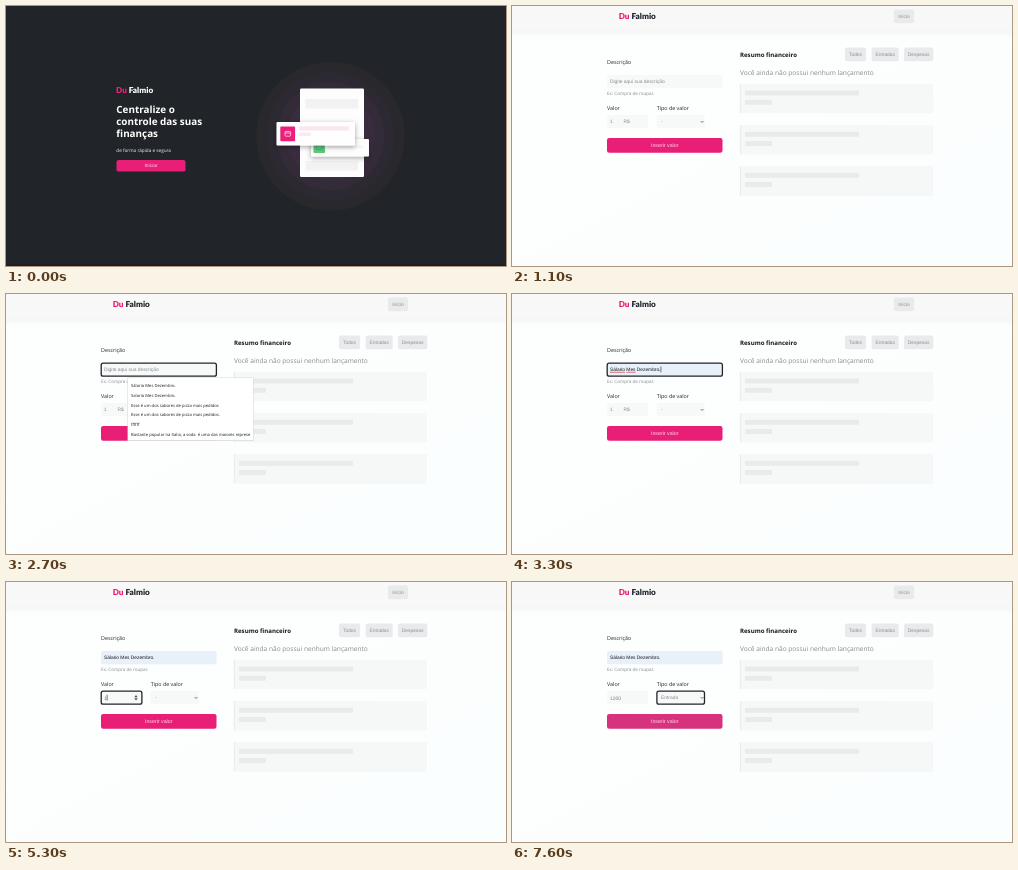
These frames come from a looping animation (500x260 px, 8000 ms). An HTML page:

```html
<!DOCTYPE html>
<html lang="pt-BR">
<head>
<meta charset="utf-8">
<title>Finanças</title>
<style>
html, body { margin: 0; height: 100%; overflow: hidden; background: #212529; }
svg { display: block; width: 100vw; height: 100vh; }
text { font-family: "Open Sans", "Noto Sans", sans-serif; text-rendering: geometricPrecision; white-space: pre; }
.ui text, text.ui { font-family: "Liberation Sans", Arial, sans-serif; font-size: 4.9px; }
.logo { font: 900 8.2px Lato, sans-serif; }
.bold { font-weight: 700; }
.mid { text-anchor: middle; }
.label { font-size: 5.35px; fill: #212529; }
.field { fill: #f7f8f8; }
.ring { fill: none; stroke: #22252a; stroke-width: 1.3; }
.caret { fill: #111; }
.mute { fill: #868b90; }
.list text { font-size: 4.17px; fill: #16181b; }

/* 1% of the loop is 80 ms */
.t { animation: 8s step-end infinite; }
.home { animation-name: home; }
.dash { animation-name: dash; }
.start { fill: #e91e77; animation-name: start; }
.send { fill: #e91e77; animation-name: send; }
.spin { animation-name: spin; }
.d-ring { animation-name: d-ring; }
.d-hint { animation-name: d-hint; }
.d-fill { animation-name: d-fill; }
.d-caret { animation-name: d-caret; }
.d-spell { animation-name: d-spell; }
.d-list { animation-name: d-list; }
.d-row { animation-name: d-row; }
.v-ring { animation-name: v-ring; }
.v-hint { animation-name: v-hint; }
.v-caret { animation-name: v-caret; }
.n1 { animation-name: n1; }
.n2 { animation-name: n2; }
.n3 { animation-name: n3; }
.n4 { animation-name: n4; }
.s-ring { animation-name: s-ring; }
.s-list { animation-name: s-list; }
.s-row { animation-name: s-row; }
.s-none { animation-name: s-none; }
.s-in { animation-name: s-in; }

@keyframes home { 0% { opacity: 1 } 13.75%, 100% { opacity: 0 } }
@keyframes dash { 0% { opacity: 0 } 13.75%, 100% { opacity: 1 } }
@keyframes start { 0% { fill: #e91e77 } 5%, 100% { fill: #d8367f } }
@keyframes send {
  0% { fill: #e91e77 } 20% { fill: #d6327d } 21.25% { fill: #e91e77 } 95%, 100% { fill: #d6327d }
}
@keyframes spin {
  0% { opacity: 0 } 21.25% { opacity: 1 } 22.5% { opacity: 0 } 47.5% { opacity: 1 } 85%, 100% { opacity: 0 }
}
@keyframes d-ring { 0% { opacity: 0 } 26.25% { opacity: 1 } 51.25%, 100% { opacity: 0 } }
@keyframes d-hint { 0% { opacity: 1 } 35%, 100% { opacity: 0 } }
@keyframes d-fill { 0% { opacity: 0 } 35%, 100% { opacity: 1 } }
@keyframes d-caret {
  0% { opacity: 0; transform: none } 26.25% { opacity: 1; transform: none }
  33.75% { opacity: 0; transform: none } 41.25% { opacity: 1; transform: translateX(50.8px) }
  46.25%, 100% { opacity: 0; transform: none }
}
@keyframes d-spell { 0% { opacity: 0 } 41.25% { opacity: 1 } 51.25%, 100% { opacity: 0 } }
@keyframes d-list { 0% { opacity: 0 } 26.25% { opacity: 1 } 41.25%, 100% { opacity: 0 } }
@keyframes d-row { 0% { opacity: 0 } 35% { opacity: 1 } 41.25%, 100% { opacity: 0 } }
@keyframes v-ring { 0% { opacity: 0 } 51.25% { opacity: 1 } 85%, 100% { opacity: 0 } }
@keyframes v-hint { 0% { opacity: 1 } 66.25%, 100% { opacity: 0 } }
@keyframes v-caret {
  0% { opacity: 0; transform: none } 51.25% { opacity: 1; transform: none }
  58.75% { opacity: 0; transform: none } 66.25% { opacity: 1; transform: translateX(2.7px) }
  67.5% { opacity: 1; transform: translateX(5.4px) } 71.25% { opacity: 1; transform: translateX(8.1px) }
  72.5% { opacity: 1; transform: translateX(10.9px) } 80%, 100% { opacity: 0; transform: none }
}
@keyframes n1 { 0% { visibility: hidden } 66.25%, 100% { visibility: visible } }
@keyframes n2 { 0% { visibility: hidden } 67.5%, 100% { visibility: visible } }
@keyframes n3 { 0% { visibility: hidden } 71.25%, 100% { visibility: visible } }
@keyframes n4 { 0% { visibility: hidden } 72.5%, 100% { visibility: visible } }
@keyframes s-ring { 0% { opacity: 0 } 85%, 100% { opacity: 1 } }
@keyframes s-list { 0% { opacity: 0 } 85% { opacity: 1 } 91.25%, 100% { opacity: 0 } }
@keyframes s-row { 0% { transform: none } 87.5%, 100% { transform: translateY(8px) } }
@keyframes s-none { 0% { opacity: 1 } 91.25%, 100% { opacity: 0 } }
@keyframes s-in { 0% { opacity: 0 } 91.25%, 100% { opacity: 1 } }
</style>
</head>
<body>
<svg viewBox="0 0 500 260" preserveAspectRatio="none">
  <defs>
    <filter id="shade" x="-20%" y="-40%" width="140%" height="200%">
      <feDropShadow dx="0" dy="1.5" stdDeviation="2.5" flood-color="#000" flood-opacity=".35"/>
    </filter>
    <filter id="soft" x="-10%" y="-50%" width="120%" height="200%"><feGaussianBlur stdDeviation=".7"/></filter>
    <linearGradient id="fade" x2="0" y2="1"><stop stop-color="#f5f5f6"/><stop offset="1" stop-color="#fdfefe"/></linearGradient>
    <linearGradient id="page" x2="1" y2="1"><stop stop-color="#fefefe"/><stop offset="1" stop-color="#fbfefe"/></linearGradient>
    <g id="empty">
      <rect x="228" width="193" height="29.5" rx="1" fill="#f6f7f7"/>
      <rect x="227.8" width="1.2" height="29.5" fill="#ececed"/>
      <g fill="#e9eaea" filter="url(#soft)">
        <rect x="233" y="6.8" width="114" height="5" rx="1"/>
        <rect x="233" y="16" width="27" height="5" rx="1"/>
      </g>
    </g>
  </defs>

  <g class="t home">
    <rect width="500" height="260" fill="#212529"/>
    <rect y="258.5" width="500" height="1.5" fill="#1b1e22"/>
    <text class="logo" x="110" y="87.4" fill="#fff"><tspan fill="#f0217c">Du</tspan> Falmio</text>
    <g class="bold" font-size="9.9" fill="#fff">
      <text x="110.3" y="107.3">Centralize o</text>
      <text x="110.3" y="119.1">controle das suas</text>
      <text x="110.3" y="130.9">finanças</text>
    </g>
    <text x="110.3" y="146.2" font-size="4.67" fill="#f4f5f6">de forma rápida e segura</text>
    <rect class="t start" x="110.5" y="154" width="69" height="11.6" rx="2.2"/>
    <text class="ui mid" x="145" y="161.4" fill="#fbd9e8">Iniciar</text>

    <circle cx="324.5" cy="130.3" r="74.3" fill="#28282d"/>
    <circle cx="324.5" cy="130.3" r="64" fill="#2d2932"/>
    <circle cx="324.5" cy="130.3" r="54" fill="#342b39"/>
    <circle cx="324.5" cy="130.3" r="44" fill="#3a2c3f"/>
    <rect x="294" y="82.5" width="64" height="88.5" rx="1.2" fill="#fdfdfd"/>
    <g fill="#f2f2f3">
      <rect x="299.5" y="93" width="52.5" height="9.5" rx="1"/>
      <rect x="299.5" y="155" width="52.5" height="9.5" rx="1"/>
    </g>
    <g filter="url(#shade)">
      <rect x="305" y="133" width="58" height="17.5" rx="1" fill="#fdfdfd"/>
      <rect x="307.5" y="135.5" width="11.5" height="11.5" rx=".8" fill="#5fc67c"/>
    </g>
    <rect x="310.5" y="139.5" width="5.5" height="4" rx=".8" fill="none" stroke="#4aa765" stroke-width=".7"/>
    <rect x="322" y="139" width="35" height="3.5" rx="1" fill="#f3f6f4"/>
    <g filter="url(#shade)">
      <rect x="270.5" y="116" width="78.5" height="23.5" rx="1" fill="#fefefe"/>
    </g>
    <rect x="274.3" y="120.5" width="14.8" height="14.8" rx="1" fill="#ec1f79"/>
    <g fill="none" stroke="#ffd9ea" stroke-width=".8">
      <rect x="279" y="125.4" width="5.6" height="4.8" rx=".9"/>
      <path d="M279 127h5.6"/>
    </g>
    <rect x="293" y="120.3" width="50" height="4.2" rx="1" fill="#fbe6ef"/>
    <rect x="293" y="126.5" width="12" height="3.5" rx="1" fill="#fbeaf1"/>
  </g>

  <g class="t dash">
    <rect width="500" height="260" fill="url(#page)"/>
    <rect width="500" height="25" fill="#f8f8f9"/>
    <rect y="25" width="500" height="6.5" fill="url(#fade)"/>
    <text class="logo" x="106.7" y="13" fill="#212529"><tspan fill="#e91e77">Du</tspan> Falmio</text>

    <g fill="#e9eaeb">
      <rect x="382" y="3.5" width="20" height="13.7" rx="2"/>
      <rect x="333" y="41.5" width="21" height="13.7" rx="2"/>
      <rect x="359.7" y="41.5" width="27" height="13.7" rx="2"/>
      <rect x="392" y="41.5" width="29.3" height="13.7" rx="2"/>
    </g>
    <g class="ui mid" fill="#8d9296">
      <text x="392" y="12">Início</text>
      <text x="343.5" y="50">Todos</text>
      <text x="373.2" y="50">Entradas</text>
      <text x="406.6" y="50">Despesas</text>
    </g>

    <text class="bold" x="228" y="50.7" font-size="6.1" fill="#17191c">Resumo financeiro</text>
    <text class="mute" x="228" y="69" font-size="6.57">Você ainda não possui nenhum lançamento</text>
    <use href="#empty" y="77.7"/>
    <use href="#empty" y="119"/>
    <use href="#empty" y="160"/>

    <text class="label" x="95" y="58.2">Descrição</text>
    <text class="label" x="95" y="104">Valor</text>
    <text class="label" x="144.7" y="104">Tipo de valor</text>
    <text class="mute" x="95" y="89" font-size="4.56">Ex: Compra de roupas</text>
    <rect class="field" x="95" y="69" width="115.5" height="13.3" rx="2"/>
    <rect class="field" x="95" y="109" width="41" height="13.3" rx="2"/>
    <rect class="field" x="144.7" y="109" width="48" height="13.3" rx="2"/>
    <rect class="t send" x="95" y="132" width="115.5" height="14.8" rx="2.2"/>
    <text class="ui mid" x="152.7" y="141.2" fill="#fbdbe9" style="font-size:5.25px">Inserir valor</text>

    <g class="t d-hint ui mute"><text x="98" y="77.2">Digite aqui sua descrição</text></g>
    <g class="t d-fill">
      <rect x="95" y="69" width="115.5" height="13.3" rx="2" fill="#e8f0fa"/>
      <text class="ui" x="98" y="77.2" fill="#16181b" style="font-size:4.83px">Sálario Mes Dezembro.</text>
    </g>
    <path class="t d-spell" d="M98 78.3h15M114.5 78.3h9" stroke="#e0403f" stroke-width=".7"/>
    <rect class="t d-caret caret" x="97.7" y="72.6" width=".6" height="5.8"/>
    <rect class="t d-ring ring" x="95.2" y="69.2" width="115.2" height="13" rx="2"/>

    <g class="t v-hint ui mute">
      <text x="98" y="117.4">1</text>
      <text x="111.5" y="117.4">R$</text>
    </g>
    <text class="ui" x="98" y="117.5" fill="#777c81"><tspan class="t n1">1</tspan><tspan class="t n2">2</tspan><tspan class="t n3">0</tspan><tspan class="t n4">0</tspan></text>
    <path class="t spin" d="M128.3 115.2l1.7-2.2 1.7 2.2zM128.3 116.2l1.7 2.2 1.7-2.2z" fill="#4c5054"/>
    <rect class="t v-caret caret" x="97.9" y="112.8" width=".6" height="5.8"/>
    <rect class="t v-ring ring" x="95.2" y="109.2" width="40.7" height="13" rx="2"/>

    <g class="ui mute">
      <text class="t s-none" x="149" y="117.4">-</text>
      <text class="t s-in" x="149" y="117.4">Entrada</text>
    </g>
    <path d="M188.6 115l1.5 1.5 1.5-1.5" fill="none" stroke="#5d6165" stroke-width=".8"/>
    <rect class="t s-ring ring" x="144.9" y="109.2" width="47.6" height="13" rx="2"/>

    <g class="t d-list list">
      <rect x="122" y="84" width="125" height="62.4" fill="#fff" filter="url(#soft)" stroke="#d4d6d8"/>
      <rect x="122" y="84" width="125" height="62.2" fill="#fff"/>
      <rect class="t d-row" x="122" y="86.2" width="125" height="9.8" fill="#e6e7e8"/>
      <text x="125" y="92.7">Sálario Mes Dezembro.</text>
      <text x="125" y="102.6">Salario Mes Dezembro.</text>
      <text x="125" y="112.5">Esse é um dos sabores de pizza mais pedidos</text>
      <text x="125" y="122.4">Esse é um dos sabores de pizza mais pedidos.</text>
      <text x="125" y="132.2">ffffff</text>
      <text x="125" y="142.1">Bastante popular na Italia, a soda  é uma das maiores represe</text>
    </g>

    <g class="t s-list ui">
      <rect x="144.7" y="122.6" width="48" height="24.4" fill="#fff" stroke="#cfd2d4" stroke-width=".5"/>
      <rect class="t s-row" x="145" y="122.9" width="47.4" height="8" fill="#dfe1e3"/>
      <g fill="#50555a">
        <text x="149" y="128.6">-</text>
        <text x="149" y="136.6">Entrada</text>
        <text x="149" y="144.6">Despesa</text>
      </g>
    </g>
  </g>
</svg>
</body>
</html>
```
